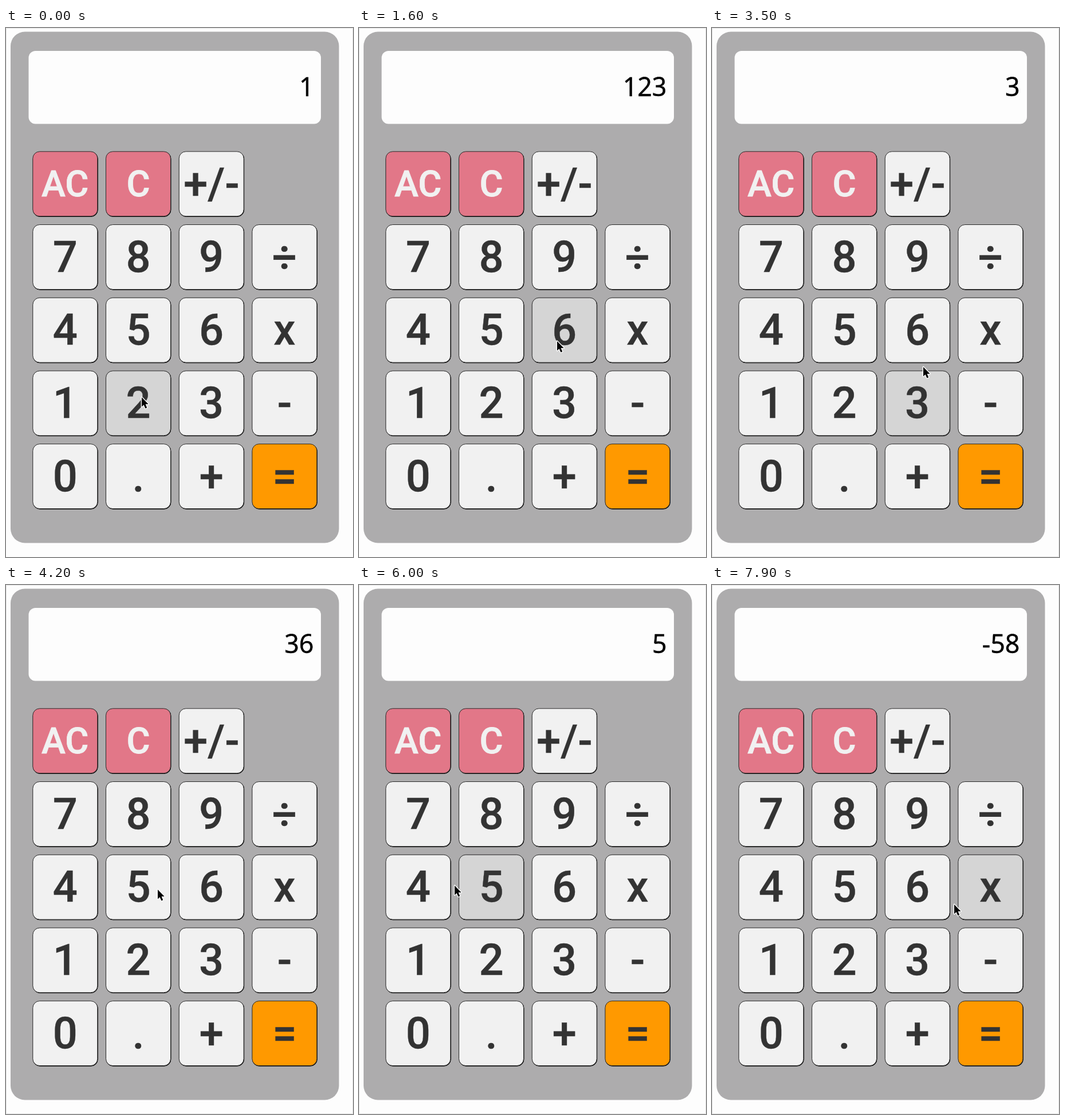
An HTML page for the animation above (8000 ms loop, 606 px wide and 924 px high).

```html
<!DOCTYPE html>
<html lang="en">
<head>
<meta charset="utf-8">
<title>Calculator</title>
<style>
  html, body { margin: 0; width: 100%; height: 100%; overflow: hidden; background: #fdfdfd; }
  svg { display: block; width: 606px; height: 924px; }
  .key rect { fill: #f1f1f1; stroke: #2a2a2a; }
  .key .shade { fill: #000; stroke: #000; }
  .key text { font: 500 76px Roboto, sans-serif; fill: #333; stroke: #333; stroke-width: .4; text-anchor: middle; }
  .key.clear .face { fill: #e27788; }
  .key.clear text { font-size: 63px; fill: #f1f1f1; stroke: #f1f1f1; stroke-width: .8; }
  .key.equals .face { fill: #ff9900; }
  .key.hover .face { fill: #d5d5d5; }
  #readout { font: 400 44.8px "Noto Sans", "Open Sans", sans-serif; stroke: #000; stroke-width: .4; text-anchor: end; }
</style>
</head>
<body>
<svg viewBox="0 0 606 924">
  <path id="edge" fill="none" stroke="#e6e6e6"/>
  <rect x="8" y="6.5" width="573.5" height="893" rx="25" fill="#adacad"/>
  <rect x="39.5" y="40" width="510.5" height="127.5" rx="12" fill="#fdfdfd"/>
  <text id="readout" x="537.5" y="118.5"></text>
  <g id="keys"></g>
  <path id="cursor" d="M1 2V18.5L4.6 15.2L7.4 21.4L10.2 20.2L7.6 14H12.6Z"
    stroke="#fff" stroke-width="2.6" stroke-linejoin="round" paint-order="stroke"/>
</svg>
<script>
const LOOP = 8000, STEP = 100, PITCH = 127.7, SIZE = 113, LEFT = 46.8, TOP = 215.8;
const rows = ["AC C +/-", "7 8 9 ÷", "4 5 6 x", "1 2 3 -", "0 . + ="];

// time, pointer x, pointer y, and the reading if a key is pressed there
const stops = [
  [0, 236, 643, "1"], [300, 240, 648, "12"], [1100, 352, 644, "123"],
  [1600, 345, 545], [1900, 345, 545], [2250, 362, 778], [2600, 399, 688],
  [3200, 376, 650, "3"], [3800, 360, 530, "36"], [4300, 240, 530, "365"],
  [4700, 468, 633], [5000, 482, 640, "488"], [5700, 232, 536, "5"],
  [6000, 166, 523], [6600, 230, 404, "58"], [7300, 350, 282, "-58"],
  [7700, 474, 530], [7900, 422, 556]
];

const $ = id => document.getElementById(id);
const keys = [];

function make(tag, attrs, parent) {
  const el = document.createElementNS("http://www.w3.org/2000/svg", tag);
  for (const name in attrs) el.setAttribute(name, attrs[name]);
  return parent.appendChild(el);
}

function addKey(label, col, row) {
  const x = LEFT + col * PITCH, y = TOP + row * PITCH;
  const clear = label.includes("C");
  const kind = clear ? " clear" : label === "=" ? " equals" : "";
  const el = make("g", { class: "key" + kind }, $("keys"));
  const box = { width: SIZE, height: SIZE, rx: 12 };
  make("rect", { ...box, x: x + 0.5, y: y + 0.7, class: "shade" }, el);
  make("rect", { ...box, x, y, class: "face" }, el);
  make("text", { x: x + SIZE / 2, y: y + SIZE / 2 + (clear ? 21.5 : 25.7) }, el).textContent = label;
  keys.push({ el, x, y });
}
rows.forEach((row, r) => row.split(" ").forEach((label, c) => addKey(label, c, r)));

function pointerAt(t) {
  const i = Math.max(0, stops.findLastIndex(s => s[0] <= t));
  const [t0, x0, y0] = stops[i];
  const [t1, x1, y1] = stops[i + 1] || [LOOP, x0, y0];
  const k = Math.max(0, (t - t0) / (t1 - t0));
  return [x0 + (x1 - x0) * k, y0 + (y1 - y0) * k];
}

function draw(t) {
  const [x, y] = pointerAt(t);
  $("cursor").setAttribute("transform", `translate(${x} ${y})`);
  $("readout").textContent = stops.findLast(s => s[3] && s[0] <= t)[3];
  $("edge").setAttribute("d", t < 2700
    ? "M.5 772V.5H605.5V772" : "M.5 .5H605.5V923.5H.5Z");
  // highlighting trails the pointer by one step
  const [hx, hy] = pointerAt(t - STEP);
  for (const k of keys) {
    const over = hx >= k.x && hx <= k.x + SIZE && hy >= k.y && hy <= k.y + SIZE;
    k.el.classList.toggle("hover", over);
  }
}

const start = performance.now();
function tick() {
  const t = (performance.now() - start) % LOOP;
  draw(Math.floor(t / STEP) * STEP);
  requestAnimationFrame(tick);
}
tick();
</script>
</body>
</html>
```
